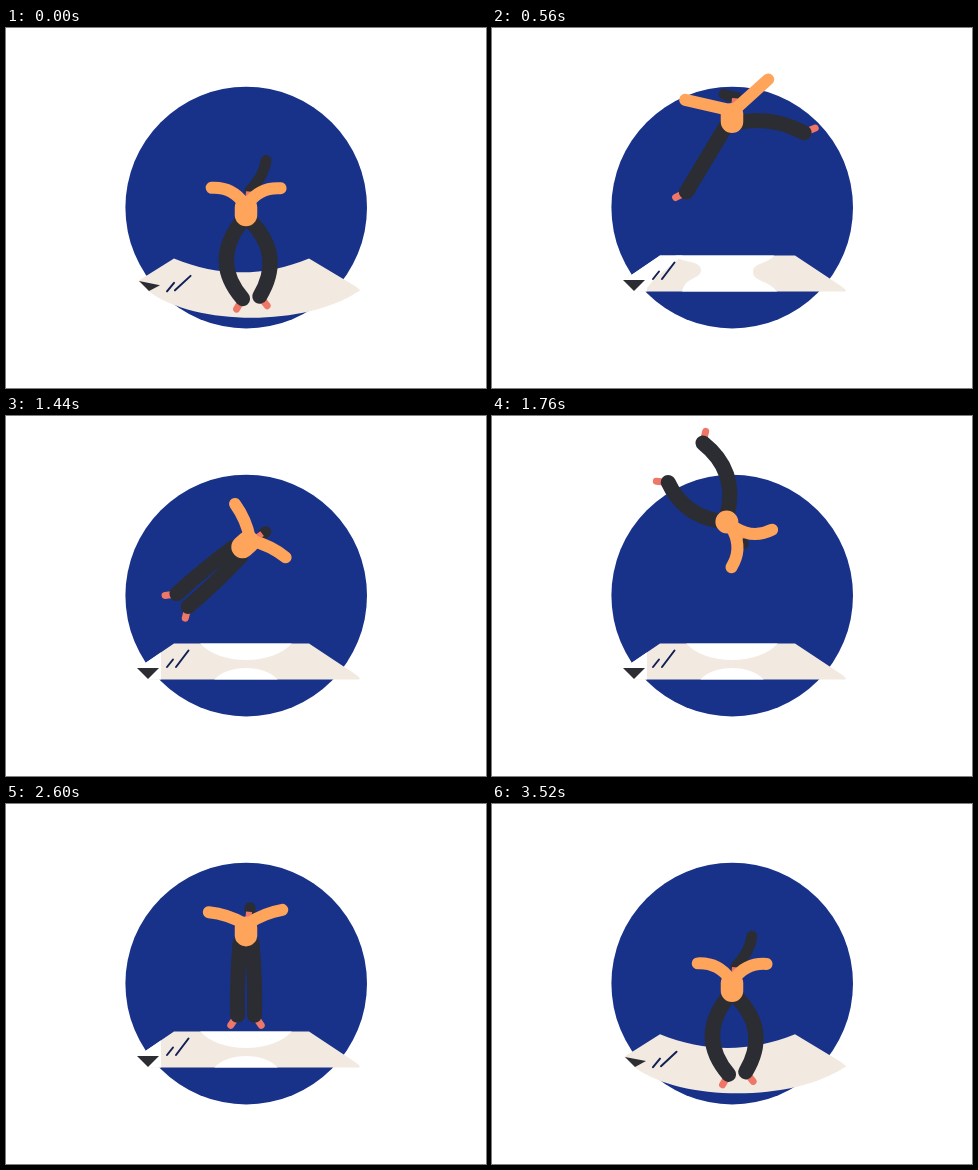
These frames come from a looping animation (480 by 360 pixels, 3560 ms). An HTML page with a canvas:

```html
<!DOCTYPE html>
<html lang="en">
<head>
<meta charset="utf-8">
<title>Trampoline</title>
<style>
html, body { margin: 0; width: 100%; height: 100%; overflow: hidden; background: #fff; }
canvas { display: block; width: 480px; height: 360px; }
</style>
</head>
<body>
<canvas id="stage" width="480" height="360"></canvas>
<script>
const ctx = document.getElementById('stage').getContext('2d');
const LOOP = 3560, STEP = 40;
const BLUE = '#18328a', NAVY = '#111f55', CREAM = '#f2e9e0';
const DARK = '#2b2d33', SKIN = '#ffa45b', PINK = '#ee7767';

const lerp = (a, b, k) => a + (b - a) * k;
const ramp = (from, to, v) => Math.min(1, Math.max(0, (v - from) / (to - from)));
const smooth = (from, to, v) => {
  const k = ramp(from, to, v);
  return k * k * (3 - 2 * k);
};

// Legs: outward angle from straight down, reach, knee bow.
// Arms: left and right angle above level, reach, inward bow. Hair: sideways lean.
const crouch = { left: [-2, 75, 15], right: [6, 74, 14], arms: [26, 25, 36, 5], hair: [16] };
const rise = { left: [2, 72, 1], right: [2, 72, 1], arms: [18, 22, 37, 2], hair: [0] };
const leap = { left: [31, 77, 0], right: [81, 67, 6], arms: [13, 42, 46, 0], hair: [-12] };
const flip = { left: [26, 75, 12], right: [7, 62, 8], arms: [47, 42, 36, 5], hair: [0] };
const split = { left: [71, 71, 0], right: [89, 67, 0], arms: [8, 45, 47, 0], hair: [-10] };
const land = { left: [1, 64, 4], right: [5, 64, 1], arms: [51, 54, 34, 0], hair: [2] };
const squat = { left: [8, 64, 17], right: [0, 62, 14], arms: [64, 53, 39, 0], hair: [-9] };

const hops = [
  { start: -20, end: 1190, top: 93, power: 2, trick: leap, landing: land, hairUp: 0.8 },
  { start: 1190, end: 2375, top: 106, power: 2.3, trick: flip, landing: squat, hairUp: 0.7 },
  { start: 2375, end: 3540, top: 93, power: 2, trick: split, landing: land, hairUp: 0.58 }
];

function mix(a, b, k) {
  const out = {};
  for (const part in a) out[part] = a[part].map((v, i) => lerp(v, b[part][i], k));
  return out;
}

// Every hop runs crouch, rise, trick, landing, crouch.
function poseAt({ trick, landing }, p) {
  let pose = mix(crouch, rise, smooth(0.02, 0.14, p));
  pose = mix(pose, trick, smooth(0.28, 0.46, p));
  pose = mix(pose, landing, smooth(0.55, 0.78, p));
  return mix(pose, crouch, smooth(0.942, 0.985, p));
}

function fill(color, draw) {
  ctx.fillStyle = color;
  ctx.beginPath();
  draw();
  ctx.fill();
}

function polygon(color, points) {
  fill(color, () => points.forEach(p => ctx.lineTo(...p)));
}

function line(color, width, from, to, cap = 'round') {
  limb(color, width, from, to, 0, 0, cap);
}

// A stroke whose middle is pushed off the straight line by (bx, by).
function limb(color, width, from, to, bx, by, cap = 'round') {
  ctx.strokeStyle = color;
  ctx.lineWidth = width;
  ctx.lineCap = cap;
  ctx.beginPath();
  ctx.moveTo(...from);
  ctx.quadraticCurveTo((from[0] + to[0]) / 2 + 2 * bx, (from[1] + to[1]) / 2 + 2 * by, ...to);
  ctx.stroke();
}

function lens(half, y, depth) {
  const pull = y + depth * 4 / 3;
  fill('#fff', () => {
    ctx.moveTo(240 - half, y);
    ctx.bezierCurveTo(240 - half * 0.6, pull, 240 + half * 0.6, pull, 240 + half, y);
  });
}

// White areas of the cloth while it lies flat.
function drawBareCloth(hop, u) {
  ctx.fillStyle = '#fff';
  ctx.fillRect(130, 226, 25, 40);
  if (hop.trick === leap) {
    polygon('#fff', [[155, 226], [192, 226], [182, 235], [163, 250], [155, 260]]);
    fill('#fff', () => {
      ctx.moveTo(183, 226);
      ctx.bezierCurveTo(186, 236, 209, 231, 209, 242);
      ctx.bezierCurveTo(209, 252, 192, 248, 190, 265);
      ctx.lineTo(286, 265);
      ctx.bezierCurveTo(278, 252, 261, 254, 261, 244);
      ctx.bezierCurveTo(261, 234, 278, 236, 283, 226);
    });
    return;
  }
  const upper = ramp(0.25, -0.03, u);
  lens(lerp(28, 46, upper), 227, 17 * upper);
  lens(lerp(32, 18, ramp(0, 0.7, u)), 264, -12);
}

function drawMat(hop, u, y) {
  const sag = Math.min(1.08, Math.max(0, (y - 169) / 17));
  const top = 227.6 + 2.7 * sag, bottom = 263.4;
  ctx.save();
  fill(CREAM, () => {
    ctx.moveTo(132, 252 + sag);
    ctx.lineTo(168, top);
    ctx.bezierCurveTo(213, top + 18 * sag, 258, top + 18 * sag, 303, top);
    ctx.lineTo(349, 258);
    ctx.quadraticCurveTo(357, 264, 352, bottom);
    ctx.bezierCurveTo(300, bottom + 34 * sag, 190, bottom + 34 * sag, 143, bottom);
  });
  ctx.clip();
  if (!sag) drawBareCloth(hop, u);
  ctx.restore();

  polygon(DARK, [[131 + 2 * sag, 252 + sag], [153 + sag, 252 + 5 * sag], [142 + sag, 263]]);
  line(NAVY, 2, [170 - sag, 251 + 11 * sag], [182.5 + 2 * sag, 234.5 + 13 * sag]);
  line(NAVY, 2, [161, 251 + 12 * sag], [167 + sag, 243.5 + 11 * sag]);
}

function drawLeg(side, [angle, reach, bow]) {
  const a = angle * Math.PI / 180, toe = a + 0.56;
  const hip = [side * 6, 9 - 8 * Math.sin(a)];
  const ankle = [hip[0] + side * reach * Math.sin(a), hip[1] + reach * Math.cos(a)];
  line(PINK, 7, ankle, [ankle[0] + side * 12 * Math.sin(toe), ankle[1] + 12 * Math.cos(toe)]);
  limb(DARK, 15, hip, ankle, side * bow * Math.cos(a), -bow * Math.sin(a));
}

function drawArm(side, angle, reach, bow) {
  const a = angle * Math.PI / 180, shoulder = [side * 2, -11];
  const hand = [shoulder[0] + side * reach * Math.cos(a), shoulder[1] - reach * Math.sin(a)];
  limb(SKIN, 12, shoulder, hand, -side * bow * Math.sin(a), -bow * Math.cos(a));
}

// Hair hangs short on the way up and streams upwards on the way down.
function drawHair(hop, p, lean) {
  const rising = 30 * (1 - smooth(0.02, 0.12, p));
  const falling = 42 * smooth(0.47, hop.hairUp, p) - 12 * smooth(0.945, 0.985, p);
  const lift = Math.max(3, rising, falling);
  limb(DARK, 11, [4, -24], [4 + lean, -24 - lift], lean * 0.2, 0);
}

function drawGymnast(hop, p, y) {
  const { left, right, arms: [armL, armR, reach, bow], hair: [lean] } = poseAt(hop, p);
  const flipping = hop.trick === flip;
  ctx.save();
  ctx.translate(240 - (flipping ? 5 * Math.sin(Math.PI * p) : 0), y);
  // A slow tip over, then a quicker way back to upright.
  if (flipping) ctx.rotate((135 * ramp(0.06, 0.481, p) + 225 * ramp(0.481, 0.81, p)) * Math.PI / 180);
  drawHair(hop, p, lean);
  line(PINK, 6, [2, -12], [3, -23], 'butt');
  drawLeg(-1, left);
  drawLeg(1, right);
  // The chest narrows as the arms go up.
  line(SKIN, 22.5, [0, 0.5], [0, lerp(-7, 0, ramp(28, 45, (armL + armR) / 2))]);
  drawArm(-1, armL, reach, bow);
  drawArm(1, armR, reach, bow);
  ctx.restore();
}

function render(time) {
  const t = time >= hops[2].end ? time - LOOP : time;
  const hop = hops.find(h => t < h.end);
  const p = (t - hop.start) / (hop.end - hop.start);
  const u = 2 * p - 1;
  const y = Math.min(189, lerp(hop.top, 193, Math.abs(u) ** hop.power));

  ctx.fillStyle = '#fff';
  ctx.fillRect(0, 0, 480, 360);
  fill(BLUE, () => ctx.arc(240.2, 179.6, 120.8, 0, Math.PI * 2));
  drawMat(hop, u, y);
  drawGymnast(hop, p, y);
}

const begin = performance.now();
function tick() {
  const elapsed = Math.max(0, performance.now() - begin) % LOOP;
  render(Math.floor(elapsed / STEP) * STEP);
  requestAnimationFrame(tick);
}
tick();
</script>
</body>
</html>
```
